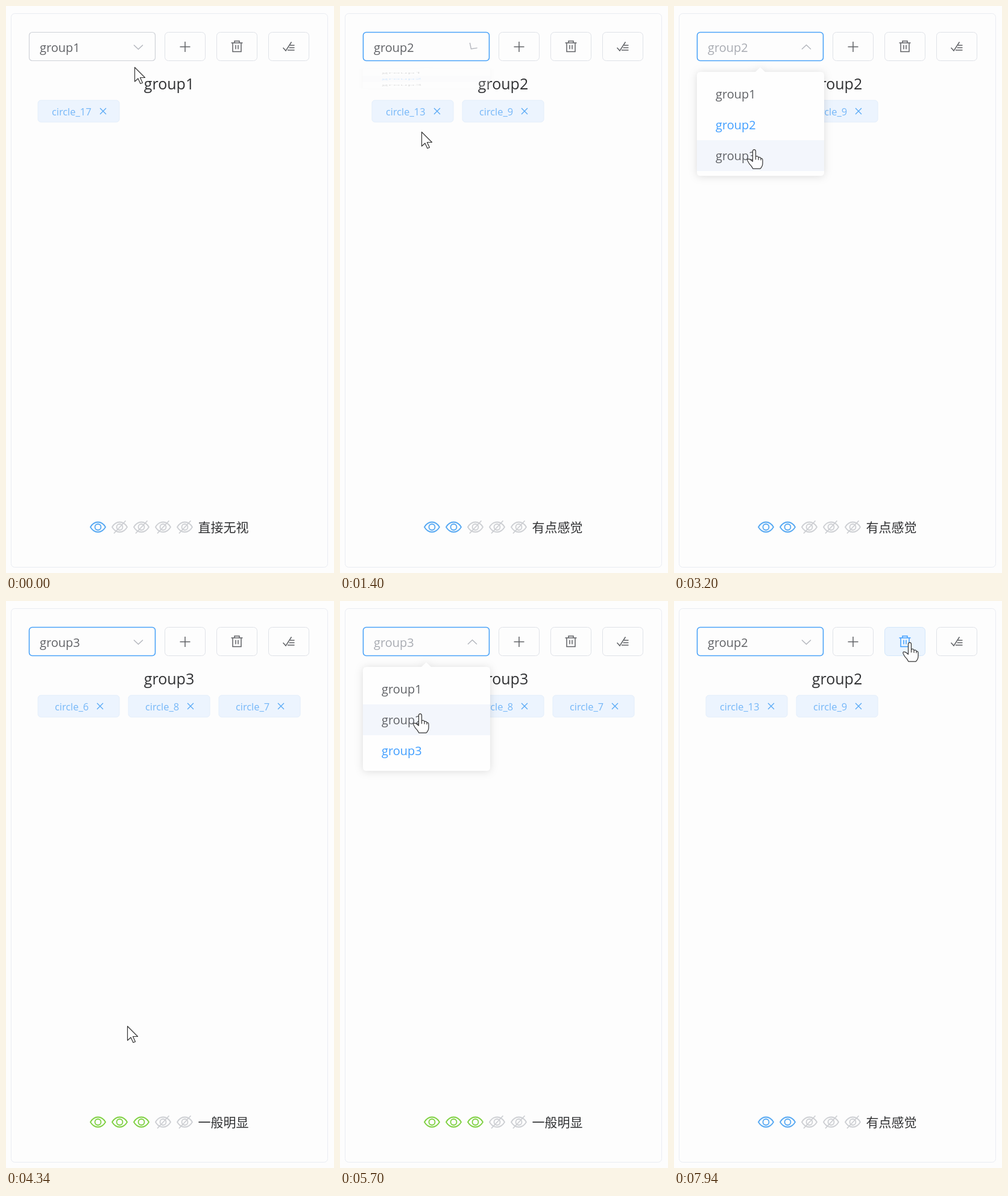
Animation of 544 by 938 pixels, one loop 8 s. Source, as an HTML page:

```html
<!DOCTYPE html>
<html lang="zh">
<head>
<meta charset="utf-8">
<style>
html, body { margin: 0; width: 100%; height: 100%; overflow: hidden; background: #fdfdfd; }
svg { display: block; width: 100%; height: 100%; font-family: "Open Sans", "Noto Sans", sans-serif; }
.frame { fill: #fdfdfd; stroke: #dfe2e8; }
.card { stroke: #e9ecf2; }
.icon { fill: none; stroke: #606266; stroke-width: 1.5; }
.hover .frame { fill: #ebf4fe; stroke: #d3e6fb; }
.hover .icon { stroke: #409eff; }
.label { font-size: 20px; fill: #606266; }
.chosen { fill: #409eff; }
.tag text { font-size: 16.4px; fill: #75b7f8; }
.tag rect { fill: #ecf4fe; stroke: #e3eefb; }
.tag path { stroke: #56a8f6; stroke-width: 1.3; }
.eye { fill: none; stroke-width: 1.8; }
#chevron { fill: none; stroke: #b2b5bc; stroke-width: 1.4; }
#title { font-size: 25px; fill: #303133; text-anchor: middle; }
#rating { font: 21px "Noto Sans CJK SC", "Noto Sans CJK", sans-serif; fill: #303133; }
#menu { transform-origin: 143px 102px; }
#panel { fill: #fefefe; filter: drop-shadow(0 1px 7px rgba(0, 0, 0, .13)); }
#highlight { fill: #f3f6fc; }
.pointer { fill: #fefefe; stroke: #333; stroke-width: 1.2; stroke-linejoin: round; }
</style>
</head>
<body>
<svg viewBox="0 0 544 938" preserveAspectRatio="none">
  <rect class="frame card" x="8.5" y="12.5" width="525" height="916" rx="6"/>
  <rect id="select" class="frame" x="38.5" y="43.5" width="209" height="47" rx="5"/>
  <text id="value" class="label" x="56" y="76"/>
  <path id="chevron" d="M-7.500-3.500 0 3.500 7.500-3.500"/>
  <g id="buttons"></g>
  <text id="title" x="270.5" y="138"/>
  <g id="tags"></g>
  <g id="eyes"></g>
  <text id="rating" x="318.5" y="869.7"/>
  <g id="menu">
    <path id="panel" d="M44 109H135L143 101.500 151 109H243q6 0 6 6V275q0 6-6 6H44q-6 0-6-6V115q0-6 6-6z"/>
    <rect id="highlight" x="38" width="211" height="51"/>
    <g id="items"></g>
  </g>
  <g id="cursor">
    <path id="arrow" class="pointer" d="M.5.500V24l5.500-5 4 8.500 3.500-1.500-4-8.500h8z"/>
    <path id="hand" class="pointer" transform="translate(0 -.8)" d="M-1.500 2Q-1.500-.500 1-.500T3.500 2V12Q3.500 10 6 10.300 8 10.500 8 12.500 11 10.800 12 14 15 13.500 15 17V22Q15 27 11 31H-1Q-3 27-7 23L-9.800 18Q-11 14.500-8 15-6 15-1.500 19zM3.500 12v4M8 12.500v4M12 14v3"/>
  </g>
</svg>
<script>
const DURATION = 8000, FADE = 300, ROW = 51, MENU_TOP = 120, BUTTON_STEP = 86;
const $ = id => document.getElementById(id);

const groups = [
  { circles: [17], text: '直接无视', color: '#54a7f2' },
  { circles: [13, 9], text: '有点感觉', color: '#54a7f2' },
  { circles: [6, 8, 7], text: '一般明显', color: '#7dd03f' }
];
const icons = [
  'M-8.500 0h17M0-8.500v17',
  'M-9.500-6.500h19M-4-7v-2.500h8v2.500M-7-6.500v14.500h14v-14.500M-2-3v7M2-3v7',
  'M-9.500 1.500l4.500 5 9.500-14.500M2-2.500h7.500M.5 1.500h9M-2 5.500h11.500'
];
// Each visit opens the menu, picks a group, then glances at the rating
const visits = [
  { open: 280, pick: 1300, group: 1, glance: 1850 },
  { open: 2480, pick: 3250, group: 2, glance: 4850 },
  { open: 5200, pick: 5780, group: 1, glance: 6250 }
];

const onSelect = [170, 75], onRating = [224, 860];
const onItem = group => [132, 137 + ROW * group];
const route = [
  [0, 213, 101],
  ...visits.flatMap(({ open, pick, group, glance }) => [
    [open - 180, ...onSelect], [open, ...onSelect],
    [pick - 150, ...onItem(group)], [pick + 50, ...onItem(group)],
    [glance, ...onRating]
  ]),
  [6970, 325, 89], [7400, 390, 70], [DURATION, 390, 70]
];

const smooth = p => p * p * (3 - 2 * p);
const clamp = p => Math.max(0, Math.min(1, p));
const easeOut = p => 1 - (1 - p) ** 4;

function pointerAt(t) {
  const next = route.findIndex(stop => stop[0] > t);
  const [t0, x0, y0] = route[next - 1], [t1, x1, y1] = route[next];
  const p = smooth((t - t0) / (t1 - t0));
  return [x0 + (x1 - x0) * p, y0 + (y1 - y0) * p];
}

function menuAmount(t) {
  const fade = since => easeOut(clamp((t - since) / FADE));
  return Math.max(...visits.map(({ open, pick }) => fade(open) - fade(pick)));
}

const button = (icon, i) => `<g class="button" transform="translate(${297 + i * BUTTON_STEP} 67.500)">
  <rect class="frame" x="-33.5" y="-24" width="67" height="47" rx="6"/><path class="icon" d="${icon}"/></g>`;

const item = (_, i) => `<text class="label" x="69" y="${MENU_TOP + 33 + i * ROW}">group${i + 1}</text>`;

function tag(number, i) {
  const shift = number > 9 ? 0 : 5;
  return `<g class="tag" transform="translate(${53 + i * 150} 156)"><rect width="135" height="36" rx="5"/>
    <text x="${23 + shift}" y="25">circle_${number}</text>
    <path d="M${103 - shift} 13l10 10m0-10l-10 10"/></g>`;
}

function eye(i, count, color) {
  const on = i < count;
  return `<g class="eye" transform="translate(${152.5 + i * 36} 862)" stroke="${on ? color : '#cdcfd3'}">
    <path d="M-12.500 0C-6-11 6-11 12.500 0 6 11-6 11-12.500 0z"/><circle r="5"/>
    ${on ? '' : '<path d="M-9.500 10.500L10-10.500"/>'}</g>`;
}

$('buttons').innerHTML = icons.map(button).join('');
$('items').innerHTML = groups.map(item).join('');
const buttons = [...$('buttons').children], items = [...$('items').children];

let shown = -1;
function showGroup(index) {
  if (index === shown) return;
  shown = index;
  const { circles, text, color } = groups[index];
  $('value').textContent = $('title').textContent = 'group' + (index + 1);
  $('tags').innerHTML = circles.map(tag).join('');
  $('eyes').innerHTML = [...Array(5).keys()].map(i => eye(i, index + 1, color)).join('');
  $('rating').textContent = text;
  items.forEach((node, i) => node.classList.toggle('chosen', i === index));
}

function draw(t) {
  const [x, y] = pointerAt(t);
  const picked = visits.filter(visit => visit.pick <= t).pop();
  const group = picked ? picked.group : 0;
  const open = visits.some(visit => t >= visit.open && t < visit.pick);
  const focused = t >= visits[0].open;
  const amount = menuAmount(t);
  const inside = (left, top, width, height) => x > left && x < left + width && y > top && y < top + height;
  showGroup(group);

  $('select').style.stroke = focused ? '#4ba3f8' : '#cfd2d8';
  $('select').style.strokeWidth = focused ? 1.6 : 1.2;
  $('value').style.fill = open ? '#a8abb2' : '';
  $('chevron').setAttribute('transform', `translate(219.5 68) rotate(${180 * amount})`);

  $('menu').style.opacity = amount;
  $('menu').style.transform = `scaleY(${amount})`;
  const onMenu = open && inside(38, MENU_TOP, 211, ROW * groups.length);
  const row = onMenu ? Math.floor((y - MENU_TOP) / ROW) : group;
  $('highlight').setAttribute('y', MENU_TOP + ROW * row);

  let hand = onMenu || inside(38, 43, 210, 48);
  buttons.forEach((node, i) => {
    const over = inside(263 + i * BUTTON_STEP, 43, 68, 45);
    node.classList.toggle('hover', over);
    hand = hand || over;
  });
  $('cursor').setAttribute('transform', `translate(${Math.round(x)} ${Math.round(y)})`);
  $('hand').style.display = hand ? '' : 'none';
  $('arrow').style.display = hand ? 'none' : '';
}

const started = performance.now();
function tick() {
  draw((performance.now() - started) % DURATION);
  requestAnimationFrame(tick);
}
tick();
</script>
</body>
</html>
```
